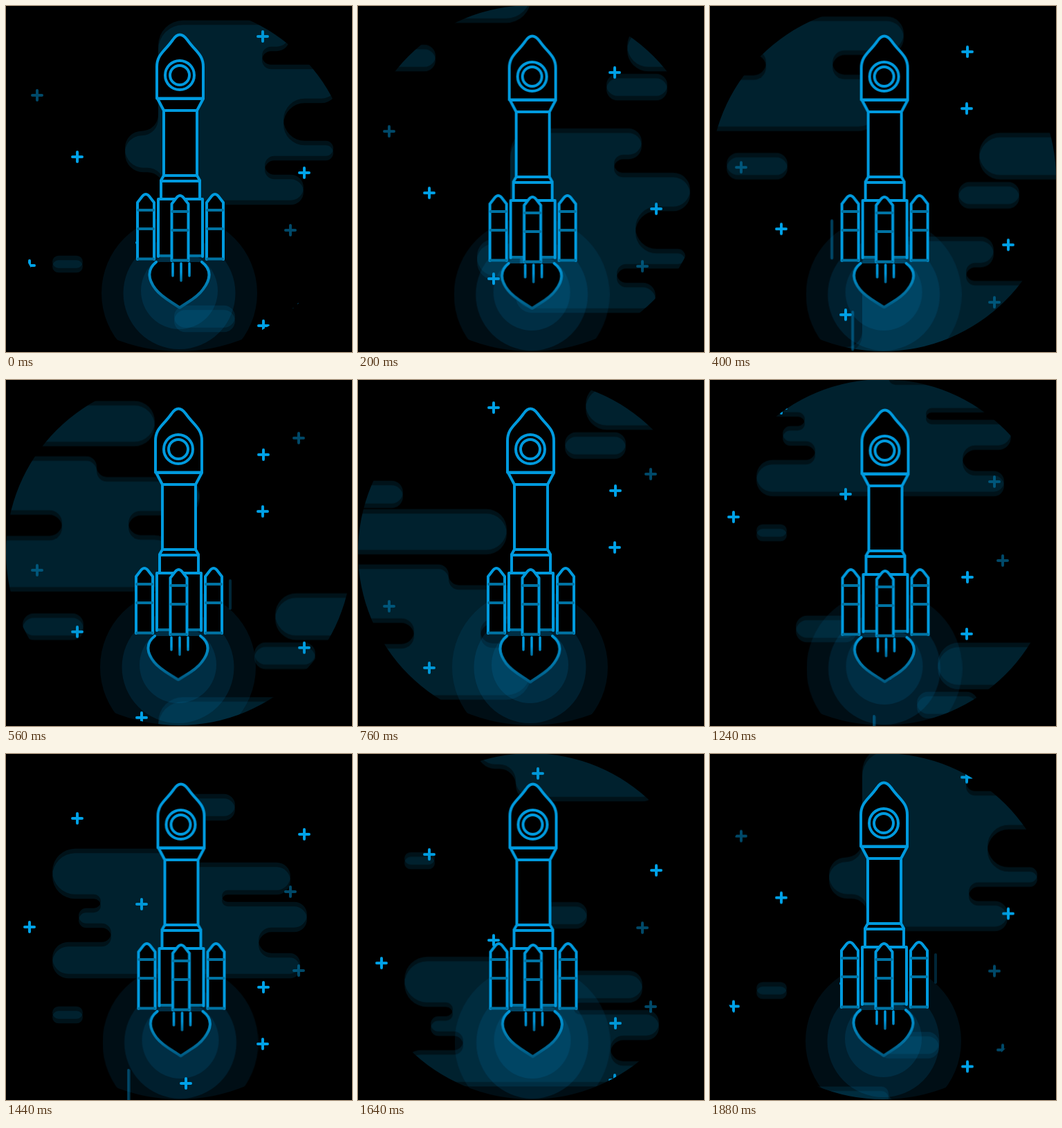
Write an HTML page that moves like this. It is 500 px wide and 500 px high and loops after 1.92 s.

```html
<!DOCTYPE html>
<html lang="en">
<head>
<meta charset="utf-8">
<title>Rocket</title>
<style>
  html, body { margin: 0; width: 100%; height: 100%; overflow: hidden; background: #000; }
  svg { display: block; width: 100vw; height: 100vh; }
  /* The scene advances every 40 ms: 48 steps in a loop. */
  .scroll { animation: scroll 1920ms steps(48) -2ms infinite; }
  .ship { animation: shake calc(1920ms / 19) step-end infinite; }
  #flame { animation: flicker 1920ms ease-in-out infinite; transform-origin: 251px 368px; }
  .streak { opacity: 0; animation: fall 960ms linear infinite; }
  .blip { animation: blip 1920ms step-end -2ms infinite; }

  @keyframes scroll { to { transform: translateY(var(--height)); } }
  @keyframes shake {
    0%, 58% { transform: none; }
    20% { transform: translate(1.5px, 2px); }
    40% { transform: translate(-2px, 0); }
    80% { transform: translate(.6px, 2px); }
  }
  @keyframes flicker {
    27% { transform: scaleY(.96); }
    50% { transform: scaleY(1.04); }
    65% { transform: scaleY(.97); }
  }
  @keyframes fall {
    0% { opacity: .42; }
    12.5% { transform: translateY(220px); opacity: .42; }
    12.6%, 100% { opacity: 0; }
  }
  @keyframes blip {
    0%, 31%, 52% { opacity: 0; }
    29%, 50%, 97.9% { opacity: .25; }
  }
</style>
</head>
<body>
<svg viewBox="0 0 500 500" fill="none" stroke-linecap="round" stroke-linejoin="round">
  <defs>
    <clipPath id="disc"><circle cx="250" cy="249" r="250"/></clipPath>
    <linearGradient id="fade" gradientUnits="userSpaceOnUse" x1="0" y1="368" x2="0" y2="437">
      <stop offset="0" stop-color="#009ade"/>
      <stop offset=".45" stop-color="#0382b8"/>
      <stop offset="1" stop-color="#005a82"/>
    </linearGradient>
    <linearGradient id="jet" gradientUnits="userSpaceOnUse" x1="0" y1="370" x2="0" y2="399">
      <stop offset=".5" stop-color="#009ade"/>
      <stop offset="1" stop-color="#006a98"/>
    </linearGradient>
    <g id="booster">
      <path d="M190 366V284L197 275Q202 269 207 275L214 284V366" fill="#000"/>
      <path d="M191 295H213M191 322H213M191 365.500H213" stroke="#0073a3"/>
    </g>
  </defs>

  <g clip-path="url(#disc)">
    <g class="scroll" style="--height: 500px" stroke="#00a2e8" stroke-width="4">
      <g id="stars"></g>
      <use href="#stars" y="-500"/>
    </g>
    <g class="scroll" style="--height: 1500px" fill="#007aac" fill-opacity=".145">
      <g id="clouds"></g>
      <use href="#clouds" y="-1500"/>
    </g>
    <g class="ship" fill="#009fe3">
      <circle cx="250.500" cy="415" r="112.500" opacity=".09"/>
      <circle cx="250.500" cy="415" r="81" opacity=".12"/>
      <circle cx="250.500" cy="411.500" r="55.500" opacity=".12"/>
    </g>
  </g>

  <g class="ship" stroke="#009ade" stroke-width="4">
    <g id="streaks"></g>
    <path class="blip" d="M326 290v40"/>
    <path id="flame" d="M217 370C202 382 207 397 216 409C225 421 240 428 251 436C262 428 277 421 285 409C294 397 299 382 283 370" fill="#000" stroke="url(#fade)"/>
    <path d="M241 372V390M253.010 372V397M265 372V390" stroke="url(#jet)" stroke-width="3.500"/>
    <path d="M220 279H284V362H220Z" fill="#000" stroke="none"/>
    <path d="M221 361H283" stroke="#0073a3"/>
    <path d="M220 362V279H284V362"/>
    <path d="M224 279V252L228 245V151L219 134H285L276 151V245L280 252V279Z" fill="#000"/>
    <path d="M228 151H276M228 245H276M224 253H280"/>
    <path d="M218 133.500V88C218 70 229 66 241 49Q251 34 262 49C274 66 285 70 285 88V133.500Z" fill="#000"/>
    <circle cx="251" cy="100" r="21"/>
    <circle cx="251" cy="100" r="14"/>
    <use href="#booster"/>
    <use href="#booster" x="100"/>
    <use href="#booster" x="49.500" y="2"/>
  </g>
</svg>

<script>
  const add = (id, html) => document.getElementById(id).insertAdjacentHTML('beforeend', html);

  // Right-angled outline with rounded corners; each step runs across to x, then down or up to y.
  function outline(...steps) {
    const pts = steps.flatMap(([x, y], i) => [[x, steps.at(i - 1)[1]], [x, y]]);
    const toward = ([x, y], [tx, ty], r, len) => `${x + (tx - x) / len * r} ${y + (ty - y) / len * r}`;
    const corners = pts.map((p, i) => {
      const a = pts.at(i - 1), b = pts[(i + 1) % pts.length];
      const [ux, uy, vx, vy] = [p[0] - a[0], p[1] - a[1], b[0] - p[0], b[1] - p[1]];
      const before = Math.hypot(ux, uy), after = Math.hypot(vx, vy);
      const r = Math.min(36, before / 2, after / 2);
      const sweep = ux * vy > uy * vx ? 1 : 0;
      return `${toward(p, a, r, before)}A${r} ${r} 0 0 ${sweep} ${toward(p, b, r, after)}`;
    });
    return `M${corners.join('L')}Z`;
  }

  const pill = (x, y, w, h) => outline([x + w, y + h], [x, y]);
  const puff = (x, y) => pill(x, y, 88, 32);
  const wisp = (x, y) => pill(x, y, 44, 18);
  const pair = (x, y) => pill(x + 30, y, 230, 61) + puff(x, y + 71);

  const clouds = [
    outline([410, 62], [370, 88], [480, 137], [401, 198], [473, 220], [374, 247], [430, 284],
      [228, 237], [172, 184], [220, 24]),
    outline([258, 535], [411, 575], [312, 592], [435, 629], [365, 666], [425, 696],
      [67, 650], [152, 623], [105, 601], [137, 581], [67, 515]),
    outline([131, 1206], [280, 1255], [177, 1290], [250, 1365], [-40, 1291], [81, 1254], [-40, 1176]),
    pill(-40, 1055, 105, 33), pill(-40, 1096, 255, 59),
    pair(299, 914), pair(359, 1374),
    puff(243, 436), puff(124, 875), puff(24, 1403),
    wisp(67, 364), wisp(67, 743)
  ].join('');
  // Two offset layers give the vertical soft edge.
  for (const dy of [-3.3, 3.3]) add('clouds', `<path transform="translate(0 ${dy})" d="${clouds}"/>`);

  function star([x, y], opacity) {
    add('stars', `<path opacity="${opacity}" d="M${x - 7} ${y}h14M${x} ${y - 7}v14"/>`);
  }
  const bright = [[372, 462], [371, 44], [103, 218], [431, 241], [34, 375], [196, 342], [260, 101]];
  const dim = [[45, 129], [411, 324], [423, 438]];
  bright.forEach(p => star(p, 1));
  dim.forEach(p => star(p, .45));

  // Streaks fall in evenly spaced lanes, each lane earlier than the one before.
  for (let lane = 0; lane < 3; lane++) {
    const delay = 391 - 36 * lane * (lane + 1) - 960;
    add('streaks', `<path class="streak" style="animation-delay:${delay}ms" d="M${175.5 + 30 * lane} 290v54"/>`);
  }
</script>
</body>
</html>
```
